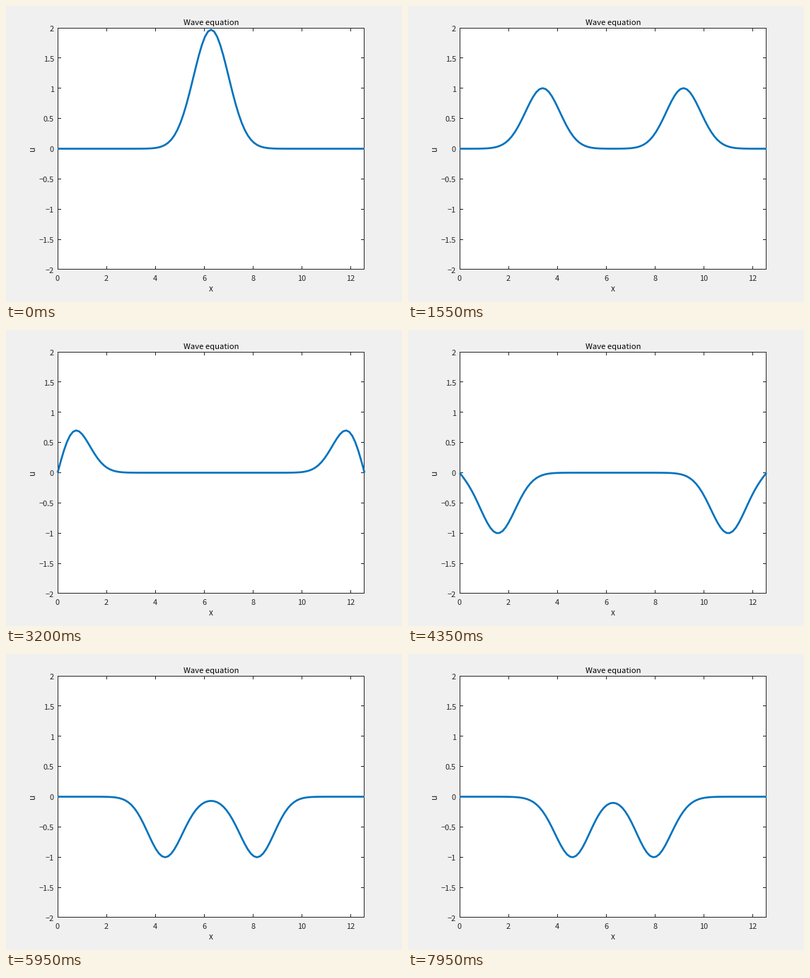
Recreate the animation shown at these times as a matplotlib script. Size 560 by 420 pixels, loop 8 s.

```python
import numpy as np
import matplotlib.pyplot as plt
from matplotlib.animation import FuncAnimation
from matplotlib.patches import Rectangle

W, H, DPI = 560, 420, 100
PT = 72 / DPI                      # points per pixel
FRAMES, INTERVAL = 160, 50
LEFT, RIGHT, TOP, BOTTOM = 73, 507, 31, 374
LENGTH = 4 * np.pi
INK = "#262626"

plt.rcParams["font.family"] = ["Noto Sans CJK JP"]


def px(x):
    return LEFT + x / LENGTH * (RIGHT - LEFT)


def py(u):
    return (TOP + BOTTOM) / 2 - u * (BOTTOM - TOP) / 4


def solve(x, steps, r2=0.5):
    """Leapfrog wave equation with fixed ends, starting at rest."""
    u = 2 * np.exp(-(x - LENGTH / 2) ** 2)
    u[[0, -1]] = 0
    prev, states = u.copy(), []
    for _ in range(steps):
        new = np.zeros_like(u)
        new[1:-1] = (2 * u[1:-1] - prev[1:-1]
                     + r2 * (u[2:] - 2 * u[1:-1] + u[:-2]))
        prev, u = u, new
        states.append(u)
    return states


x = np.linspace(0, LENGTH, 101)
states = solve(x, FRAMES)

fig = plt.figure(figsize=(W / DPI, H / DPI), dpi=DPI, facecolor="#f0f0f0")
ax = fig.add_axes([0, 0, 1, 1])
ax.set_xlim(0, W)
ax.set_ylim(H, 0)
ax.axis("off")


def block(x, y, w, h, color=INK, z=2):
    ax.add_patch(Rectangle((x, y), w, h, fc=color, ec="none", lw=0,
                           snap=False, zorder=z))


def label(x, y, text, size=11, color=INK, **kw):
    kw = {"ha": "center", "va": "baseline", **kw}
    ax.text(x, y, text, fontsize=size * PT, color=color, **kw)


# Plot box
width, height = RIGHT - LEFT, BOTTOM - TOP
block(LEFT, TOP, width, height, "white", z=1)
for y in (TOP, BOTTOM - 1):
    block(LEFT, y, width, 1)
for col in (LEFT, RIGHT - 1):
    block(col, TOP, 1, height)

# Ticks and their labels
TICK = 5
for v in range(0, 13, 2):
    col = np.floor(px(v))
    block(col, TOP, 1, TICK)
    block(col, BOTTOM - TICK, 1, TICK)
    label(px(v), 390, str(v))

for v in np.arange(-2, 2.5, 0.5):
    row = min(np.floor(py(v)), BOTTOM - 1)
    block(LEFT, row, TICK, 1)
    block(RIGHT - TICK, row, TICK, 1)
    label(68, py(v) + 4.8, f"{v:g}".replace("-", "\u2212"), ha="right")

label(290, 27, "Wave equation", size=11.3, color="black")
label(290, 405, "x", size=12)
label(41, 202, "u", size=12, rotation=90, rotation_mode="anchor")

wave, = ax.plot(px(x), py(states[0]), color="#0072bd", lw=2.667 * PT,
                solid_joinstyle="round", solid_capstyle="butt",
                snap=False, zorder=3)


def update(i):
    wave.set_ydata(py(states[i]))
    return wave,


anim = FuncAnimation(fig, update, frames=FRAMES, interval=INTERVAL,
                     repeat=True, repeat_delay=0)
plt.show()
```
